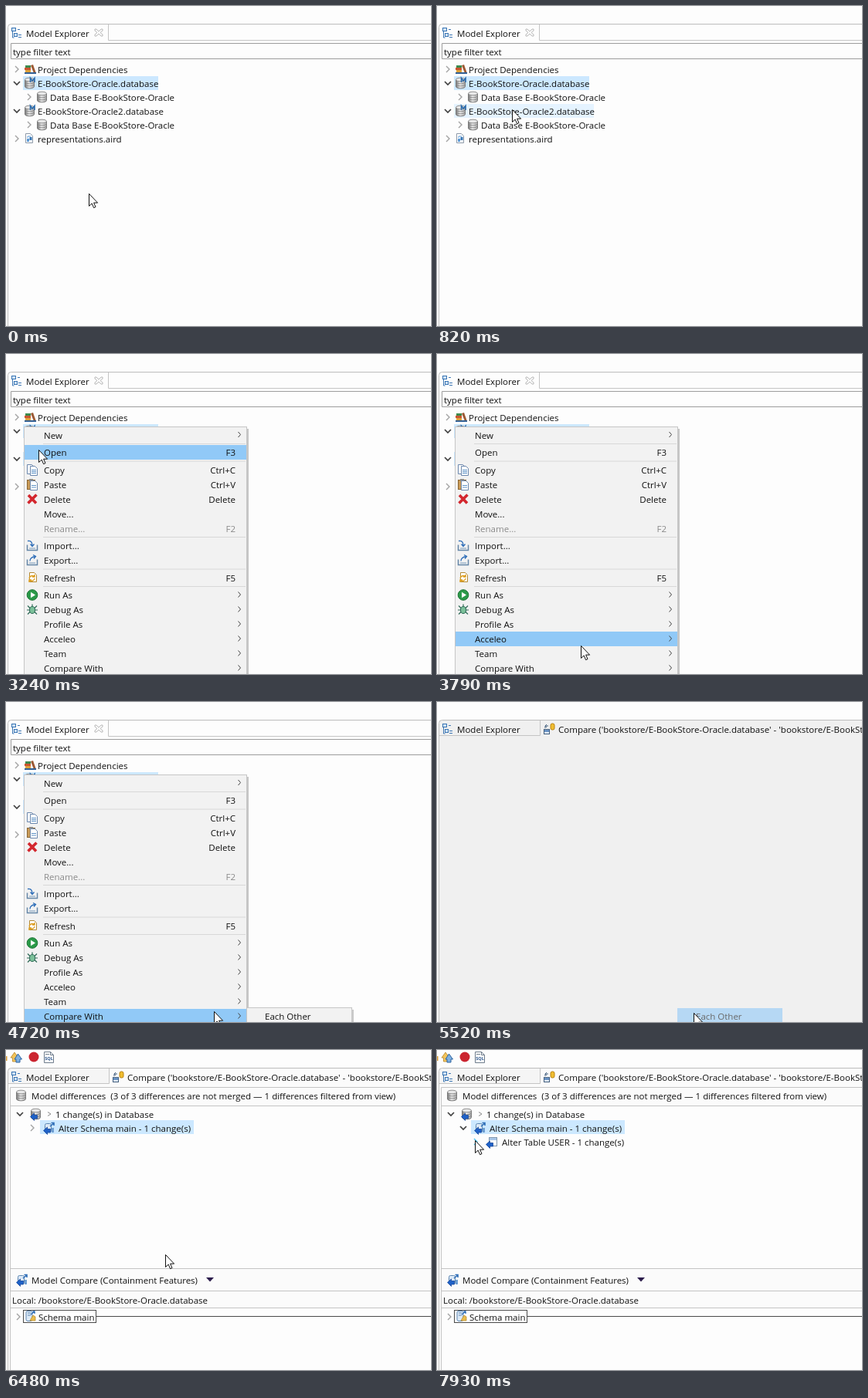
An HTML page that plays this animation: 550 px wide and 415 px high, repeating every 8 s.

```html
<!DOCTYPE html>
<html lang="en">
<head>
<meta charset="utf-8">
<title>Comparing two database models</title>
<style>
  html, body { margin: 0; height: 100%; overflow: hidden; background: #fdfdfd; }
  svg { display: block; width: 550px; height: 415px; }
  text { font: 11.5px "Open Sans", "Noto Sans", sans-serif; white-space: pre; }
</style>
</head>
<body>
<svg viewBox="0 0 550 415">
  <linearGradient id="metal">
    <stop offset="0" stop-color="#6f6f6f"/>
    <stop offset=".45" stop-color="#f0f0f0"/>
    <stop offset="1" stop-color="#a2a2a2"/>
  </linearGradient>
  <g id="stage"></g>
</svg>
<script>
const stage = document.getElementById('stage');
const LOOP = 8000;

// Bursts of screen updates: start, end, number of steps.
const bursts = [
  [150, 820, 6], [1350, 2010, 6], [2410, 2560, 2], [3090, 4060, 8],
  [4210, 4990, 7], [5520, 6480, 8], [6600, 7360, 6], [7630, 7930, 3]
];

// Pointer way points: time, x, y.
const route = [
  [0, 108, 243], [149, 108, 243], [150, 103, 170], [284, 100, 156], [820, 98, 134],
  [1350, 98, 134], [1878, 10, 95], [2010, 22, 90], [2400, 22, 90], [2410, 22, 93],
  [3090, 22, 93], [3229, 43, 124], [3783, 187, 378], [4060, 207, 399], [4210, 207, 399],
  [4990, 333, 403], [6068, 333, 403], [6480, 207, 265], [6599, 207, 265], [6600, 98, 183],
  [6752, 62, 145], [6904, 47, 125], [7056, 30, 98], [7629, 30, 98], [7630, 37, 105],
  [7930, 50, 117], [LOOP, 50, 117]
];

function screenTime(t) {
  let shown = 0;
  for (const [start, end, steps] of bursts) {
    if (t < start) break;
    const step = (end - start) / (steps - 1);
    shown = t >= end ? end : start + Math.floor((t - start) / step) * step;
  }
  return shown;
}

function pointerAt(t) {
  const i = route.findIndex(p => p[0] > t);
  const [a, b] = [route[i - 1], route[i]];
  const f = (t - a[0]) / (b[0] - a[0]);
  return [1, 2].map(n => Math.round(a[n] + (b[n] - a[n]) * f));
}

const rect = (x, y, w, h, fill, more = '') =>
  `<rect x="${x}" y="${y}" width="${w}" height="${h}" fill="${fill}" ${more}/>`;
const line = (d, color, width = 1) =>
  `<path d="${d}" fill="none" stroke="${color}" stroke-width="${width}"/>`;
const shape = (d, fill, more = '') => `<path d="${d}" fill="${fill}" ${more}/>`;
const label = (x, y, s, fill = '#111', anchor = 'start') =>
  `<text x="${x}" y="${y + 4.5}" fill="${fill}" text-anchor="${anchor}">${s}</text>`;
const at = (x, y, content) => `<g transform="translate(${x} ${y})">${content}</g>`;

// Icons, 16 x 16
const database = shape('M1.5 3.5v9a6 2.3 0 0 0 12 0v-9z', 'url(#metal)', 'stroke="#777"') +
  '<ellipse cx="7.5" cy="3.5" rx="6" ry="2.3" fill="#e9e9e9" stroke="#8a8a8a"/>' +
  line('M1.5 6.5a6 2.3 0 0 0 12 0M1.5 9.5a6 2.3 0 0 0 12 0', '#8a8a8a');
const leftArrow = shape('M.5 11.5l5-4.500v2.500h4v4.500h-4v2.500z', '#1f62c8',
  'stroke="#17479b" stroke-width=".8"');
const page = (x, y, edge = '#6d88ad') =>
  shape(`M${x} ${y}h6l3 3v9h-9z`, '#fff', `stroke="${edge}"`);
const tray = line('M1.5 7v7h13v-7', '#6687a8', 1.5) + line('M4 11.5h8', '#9fb6cd', 1.5);

const icons = {
  database,
  model: database + line('M8.500 7V1.500l2.500 3.500L14 1.500V7', '#2c6cad', 1.6),
  books: rect(2, 3, 7, 3, '#3d8a4c') + rect(1, 6, 8, 3, '#c9542f') + rect(2, 9, 7, 3, '#dca03a') +
    shape('M9 3l3-1 3.500 10h-3z', '#9c5a34') + rect(1, 12, 15, 2, '#315f94'),
  representation: page(2.5, 1.5, '#8d99a8') + rect(4, 8, 3, 4, '#5c9ad6') + rect(7.5, 6, 3, 4, '#3475b5') +
    line('M5 7V5h4', '#5c9ad6'),
  explorer: rect(1.5, 1.5, 5, 4, '#cfe3f7', 'stroke="#3b75b3"') + rect(4.5, 8.5, 4, 4, '#cfe3f7', 'stroke="#3b75b3"') +
    line('M2.5 6v8h2M9 3.5h3M10 10.5h4M10 13.5h4', '#3b75b3'),
  compare: rect(1.5, 8.5, 7, 6, '#dfe9f4', 'stroke="#44607f"') + line('M2 10.5h6', '#3e73b3', 2) +
    line('M3 7V4h4M5 2l-2 2 2 2', '#44607f') + rect(10, 1, 5, 8, '#f0bd2f', 'rx="2" stroke="#ba8415"'),
  databaseDelta: database + leftArrow,
  schemaDelta: rect(2.5, 2.5, 8, 11, '#dce9f6', 'rx="2" stroke="#5c86b2"') +
    line('M9 6l5-4M10.500 1.500H14V5', '#2f6eb8', 1.6) + rect(11, 8, 3, 6, '#6f9fd2') + leftArrow,
  tableDelta: rect(4.5, 2.5, 10, 11, '#fff', 'stroke="#8298ae"') + rect(5, 3, 9, 3, '#a9c6e6') + leftArrow,
  schema: rect(2, 1.5, 8, 13, '#dce9f6', 'rx="2" stroke="#5c86b2"') + line('M4 4h4M4 7h4', '#5c86b2') +
    line('M8 6l5-4M10.5 2H13v3', '#2f6eb8', 1.4) + shape('M7 14l4-7 3 2v5z', '#e9bd50', 'stroke="#b58520" stroke-width=".7"'),
  copy: page(1.5, 1.5) + page(5.5, 3.5) + line('M7 8.5h6M7 10.5h6M7 12.5h6', '#5f93c7'),
  paste: rect(1.5, 2.5, 10, 12, '#c99a57', 'stroke="#8b6734"') + rect(4, 1, 5, 3, '#8c8c8c') +
    page(5.5, 3.5) + line('M7 9.5h6M7 12h6', '#5f93c7'),
  remove: line('M3 3L13 13.5M13.5 2.5L2.5 13.5', '#d3272e', 3.6),
  import: tray + line('M2 2q6-1 6 6M5.5 6L8 9l2.5-3', '#2f6eb8', 1.3),
  export: tray + line('M5 9q0-5 7-6M9 1l3.5 2L10 6', '#2f6eb8', 1.3),
  refresh: page(4.5, 1.5, '#b48a35') + line('M4 9a4 4 0 0 1 7-2M11 4v3H8M11 9a4 4 0 0 1-7 2M4 14v-3h3', '#dd9d1e', 1.4),
  run: '<circle cx="8" cy="8" r="6.8" fill="#2b9a49" stroke="#1a7333"/>' + shape('M6 4.2v7.6l6-3.8z', '#fff'),
  debug: line('M2 3l4 4M14 3l-4 4M1 8.5h14M2 14l4-4M14 14l-4-4M8 1v3', '#2f6a57', 1.2) +
    '<ellipse cx="8" cy="8.5" rx="3.5" ry="4.5" fill="#7cc19a" stroke="#2f6a57"/>'
};
const icon = (name, x, y) => at(x, y - 8, icons[name]);

function chevron(x, y, open, [px, py]) {
  const hot = Math.abs(px - x) < 6 && Math.abs(py - y) < 6;
  return open
    ? line(`M${x - 4} ${y - 2}l4 4 4-4`, hot ? '#4cc2ee' : '#404040', 1.7)
    : line(`M${x - 2} ${y - 4}l4 4-4 4`, hot ? '#4cc2ee' : '#a3a3a3', 1.4);
}

// Tree rows: indent, icon, label, right edge of the highlight, expander (1 closed, 2 open)
const explorerRows = [
  [0, 'books', 'Project Dependencies', 158, 1],
  [0, 'model', 'E-BookStore-Oracle.database', 197, 2],
  [16, 'database', 'Data Base E-BookStore-Oracle', 219, 1],
  [0, 'model', 'E-BookStore-Oracle2.database', 203, 2],
  [16, 'database', 'Data Base E-BookStore-Oracle', 219, 1],
  [0, 'representation', 'representations.aird', 148, 1]
];

const explorerTab = icon('explorer', 6, 35) + label(26, 35, 'Model Explorer');
const frame = line('M2.5 415V27.5q0-4 4-4H550', '#bdbdbd');

function explorer(t, pointer) {
  const hovered = t < 3090 ? Math.floor((pointer[1] - 73) / 18) : -1;
  const rows = explorerRows.map(([indent, name, text, right, expander], i) => {
    const y = 82 + 18 * i;
    const selected = i === 1 || (i === 3 && t >= 1350);
    const fill = selected ? '#cce8ff' : i === hovered ? '#e5f3ff' : 'none';
    const left = 22 + indent;
    return rect(left, y - 9, right - left, 18, fill) +
      chevron(14 + indent, y, expander === 2, pointer) +
      icon(name, left + 1, y) + label(left + 19, y, text);
  });
  return frame + line('M132.5 24V44.5H550', '#c4c4c4') + explorerTab +
    line('M115 30h2l3 3 3-3h2v2l-3 2.5 3 2.5v2h-2l-3-3-3 3h-2v-2l3-2.5-3-2.5z', '#b0b0b0', .9) +
    line('M550 48.5H6.5v20H550', '#9c9c9c') + label(9, 59, 'type filter text') + rows.join('');
}

// Menu items: label, shortcut (">" marks a submenu), icon; null is a separator.
const menuItems = [
  ['New', '>'], null, ['Open', 'F3'], null,
  ['Copy', 'Ctrl+C', 'copy'], ['Paste', 'Ctrl+V', 'paste'], ['Delete', 'Delete', 'remove'],
  ['Move...'], ['Rename...', 'F2'], null,
  ['Import...', '', 'import'], ['Export...', '', 'export'], null,
  ['Refresh', 'F5', 'refresh'], null,
  ['Run As', '>', 'run'], ['Debug As', '>', 'debug'], ['Profile As', '>'],
  ['Acceleo', '>'], ['Team', '>'], ['Compare With', '>']
];

function menu(pointer) {
  let y = 86;
  let out = rect(26, 97, 288, 320, '#000', 'opacity=".22"') +
    rect(23.5, 94.5, 288, 330, '#f2f2f2', 'stroke="#c6c6c6"');
  for (const item of menuItems) {
    if (!item) {
      out += line(`M48 ${y + 11.5}H310`, '#d8d8d8');
      y += 3.5;
      continue;
    }
    y += 19;
    const [text, key = '', name] = item;
    const color = text === 'Rename...' ? '#8a8a8a' : '#111';
    if (Math.abs(pointer[1] - y) < 9.5) out += rect(24, y - 9.5, 287, 19, '#91c9f7');
    if (name) out += icon(name, 26, y);
    out += label(49, y, text, color) + (key === '>'
      ? line(`M300.5 ${y - 4}l3 3.5-3 3.5`, '#444')
      : label(297, y, key, color, 'end'));
  }
  return out;
}

const submenu = ([px]) =>
  rect(313, 399, 137, 20, '#000', 'opacity=".2"') +
  rect(311.5, 396.5, 136, 30, '#f2f2f2', 'stroke="#c6c6c6"') +
  (px >= 311 ? rect(312, 398, 135, 18, '#91c9f7') : '') +
  label(335, 407, 'Each Other');

const toolbar = rect(0, 8, 1.5, 6, '#dca03a') +
  at(5, 1, shape('M1 9l5-7 5 7H8.5v5h-5V9z', '#f3c45a', 'stroke="#b7862a" stroke-width=".8"') +
    shape('M6 11l4.500-7 5 7h-2.500v4h-5v-4z', '#7fb0e0', 'stroke="#2c62a0"')) +
  '<circle cx="36" cy="9" r="6.5" fill="#cb2530"/>' +
  at(48, 1, shape('M1.5 1.5h8l4 4v10h-12z', '#fff', 'stroke="#6f7d8c"') + line('M9.5 1.5v4h4M3 4.5h5', '#6f7d8c') +
    '<text x="7.5" y="12" text-anchor="middle" fill="#24508a" style="font-size:5.5px;font-weight:bold">SQL</text>');

function differences(t, pointer) {
  const expanded = t >= 7200;
  return toolbar + rect(3, 44, 547, 371, '#fbfbfb') +
    line('M550 48.5H5.5V415M6 72.5H550M6 283.5H550M6 312.5H550M6 334.5H550', '#c4c4c4') +
    rect(6, 73, 544, 210, '#fdfdfd') + rect(6, 335, 544, 80, '#fdfdfd') +
    icon('database', 12, 59) +
    label(33, 59, 'Model differences  (3 of 3 differences are not merged — 1 differences filtered from view)') +
    chevron(18, 83, true, pointer) + icon('databaseDelta', 31, 83) +
    line('M54 80.5l4 2.5-4 2.5', '#8b8b8b') + label(64, 83, '1 change(s) in Database') +
    rect(44, 91, 199, 18, '#cce8ff') + chevron(34, 101, expanded, pointer) +
    icon('schemaDelta', 48, 101) + label(68, 101, 'Alter Schema main - 1 change(s)') +
    (expanded ? chevron(50, 119, false, pointer) + icon('tableDelta', 63, 119) +
      label(84, 119, 'Alter Table USER - 1 change(s)') : '') +
    icon('schemaDelta', 13, 298) + label(33, 298, 'Model Compare (Containment Features)') +
    shape('M259 295h10l-5 5.5z', '#2c1d4c') +
    label(8, 324, 'Local: /bookstore/E-BookStore-Oracle.database') +
    chevron(16, 346, false, pointer) + rect(22.5, 337.5, 94, 16, '#fff', 'stroke="#4a4a4a"') +
    line('M117 345.5H550', '#4a4a4a') + icon('schema', 24, 345) + label(42, 346, 'Schema main');
}

function compareEditor(t, pointer) {
  const loaded = t >= 5700;
  return rect(3, 24, 547, 391, '#f0f0f0') +
    (loaded ? rect(3, 24, 130, 20, '#f5f5f5') + rect(134, 24, 416, 24, '#fbfbfb') : '') +
    (loaded ? differences(t, pointer) : '') +
    frame + line('M3 43.5H133.5V24', '#c4c4c4') + explorerTab + icon('compare', 137, 35) +
    label(157, 35, "Compare ('bookstore/E-BookStore-Oracle.database' - 'bookstore/E-BookStore-Oracle2.database')") +
    (t < 5600 ? `<g opacity=".6">${rect(311, 397, 136, 18, '#91c9f7')}${label(335, 407, 'Each Other')}</g>` : '');
}

const arrow = shape('M-.5 .5V16.5L3.2 13.1 5.6 18.7 8 17.6 5.6 12.2H10.6Z', '#fff',
  'stroke="#111" stroke-linejoin="round"');

function scene(t) {
  const pointer = pointerAt(t);
  const content = t >= 5520 ? compareEditor(t, pointer)
    : explorer(t, pointer) + (t >= 3090 ? menu(pointer) : '') + (t >= 4210 ? submenu(pointer) : '');
  return content + at(...pointer, arrow);
}

let shown = -1;
function tick() {
  const t = screenTime(performance.now() % LOOP);
  if (t !== shown) stage.innerHTML = scene(shown = t);
  requestAnimationFrame(tick);
}
tick();
</script>
</body>
</html>
```
